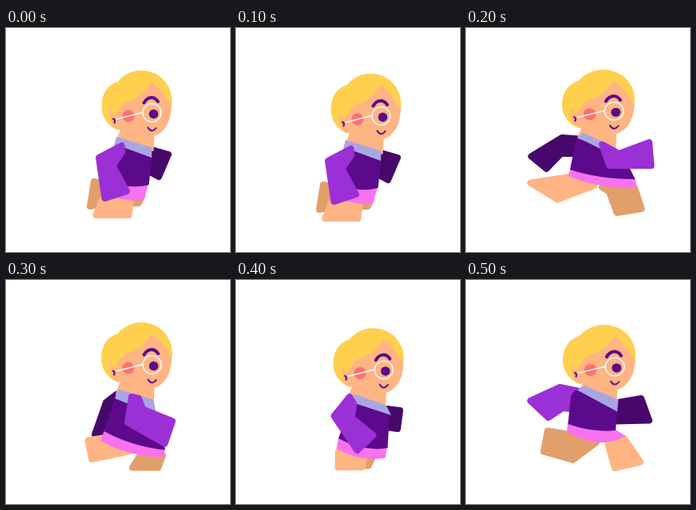
An HTML page without scripts for the animation above (0.6 s loop, 280 by 280 pixels).

```html
<!DOCTYPE html>
<html lang="en">
<head>
<meta charset="utf-8">
<title>Running character</title>
<style>
  html, body { margin: 0; width: 100%; height: 100%; overflow: hidden; background: #fff; }
  svg { display: block; width: 100vw; height: 100vh; }

  .pose { visibility: hidden; animation: show .6s step-end infinite; animation-delay: calc(var(--i) * .1s - .6s); }
  @keyframes show {
    0% { visibility: visible; }
    16.6667%, 100% { visibility: hidden; }
  }

  /* limbs get rounded corners from a stroke in the fill colour */
  .limb { fill: var(--c); stroke: var(--c); stroke-width: 8; stroke-linejoin: round; }
  .arm { --c: #9b30d6; }
  .far-arm { --c: #47086b; }
  .leg { --c: #ffb483; }
  .far-leg { --c: #e19f6c; }
  .torso { fill: #5b0a8b; }
  .hem { fill: #f872ef; }
  .collar { fill: #a9a6e5; }
  .skin { fill: #ffb483; }
  .hair { fill: #ffd04e; }
  .ink { fill: none; stroke: #5b0a8b; stroke-linecap: round; }
  .glass { fill: none; stroke: #fff; stroke-width: 1.5; }
</style>
</head>
<body>
<svg viewBox="0 0 280 280">
  <defs>
    <g id="head">
      <path class="hair" d="M140 67C146 59 157 53 169 53C191 53 207.500 70 207.500 92L206 103L140 128C128 123 119.500 112 119.500 98C119.500 82 127 71 140 67Z"/>
      <path class="skin" d="M182 67C190 73 199 84 207 98C206 117 199 130 185.500 135L184.500 154L137 143L143 127C135 127 130 119 131 112L129.500 98Q132 105 135 110C141 107 142 97 150 92C163 89 174 80 182 67Z"/>
      <circle cx="153" cy="110" r="7.600" fill="#ff716c"/>
      <path class="ink" stroke-width="2" d="M134 113.500Q137 115 135.500 118.500"/>
      <path class="ink" stroke-width="4" d="M172.500 93.500C177 85.500 185 84.500 190 92"/>
      <path class="ink" stroke-width="2" d="M177.500 124.500Q182 132 187.500 125"/>
      <circle cx="184.500" cy="107.500" r="5.800" fill="#5b0a8b"/>
      <circle class="glass" cx="182.400" cy="106" r="11.400"/>
      <path class="glass" d="M171 105.500L138 114"/>
    </g>

    <g id="passing">
      <path class="limb far-arm" d="M182 152L203 158L191 186L178 179Z"/>
      <path class="limb far-leg" d="M110 192L122 194L120 220L105 223ZM158 210L170 210L166 219L157 219Z"/>
      <path class="limb leg" d="M120 215L156 213L153.500 234L112.500 234Z"/>
      <path class="hem" d="M139 196L178 195L172.500 214.500Q158 218 138 212Z"/>
      <use href="#head"/>
      <path class="torso" d="M137 142L183 159L178.500 196Q160 201 138 195Z"/>
      <path class="collar" d="M138 136L182.500 149.500L182 162L149 150L135 147Z"/>
      <path class="limb arm" d="M116 162L144.500 147L145 155L133.500 172L151 204L123.500 213Z"/>
    </g>
  </defs>

  <use class="pose" style="--i:0" href="#passing"/>
  <use class="pose" style="--i:1" href="#passing" x="-1" y="4"/>

  <g class="pose" style="--i:2">
    <path class="limb far-arm" d="M120 137L146 139L136 157L119 157L100.500 176L81.500 160.500Z"/>
    <path class="limb far-leg" d="M170 199L211 200L219.500 226L188.500 231L179 205Z"/>
    <path class="limb leg" d="M80.500 193.500L130 186L160 197L114.500 214.500Z"/>
    <path class="hem" d="M131 175L211 187L213.500 198.500Q168 202 127.500 185Z"/>
    <use href="#head" transform="matrix(1.035 0 0 .98 -3.700 0)"/>
    <path class="torso" d="M138 137L168 149L203 172L211.500 189Q166 189 130 177Z"/>
    <path class="collar" d="M145 130.500L180 146L172 153L140 137Z"/>
    <path class="limb arm" d="M170 145.500L191 157L229 143L231.500 172L179 172Z"/>
  </g>

  <g class="pose" style="--i:3">
    <path class="limb far-arm" d="M125 153L138 143L142 158L120 193L111 193Z"/>
    <path class="limb far-leg" d="M167 220L196 219L190.500 234.500L158 234.500Z"/>
    <path class="limb leg" d="M102.500 200.500L124 197L155 214L107 224Z"/>
    <path class="hem" d="M123.500 186L199 209L196.500 221.500Q154 221 118.500 201Z"/>
    <use href="#head" transform="matrix(1.010 0 0 1 -1.700 0)"/>
    <path class="torso" d="M136 147L188 166L199 212.500Q157 208 122.500 189Z"/>
    <path class="collar" d="M140 136.500L184.500 149.500L188 169L136 148Z"/>
    <path class="limb arm" d="M157 146L166 148L171 161.500L208 176.500L198.500 204.500L152 178Z"/>
  </g>

  <g class="pose" style="--i:4">
    <path class="limb far-arm" d="M188 161L205 163L202 186L188 184Z"/>
    <path class="limb far-leg" d="M158 222L170 223L166 232L158 232Z"/>
    <path class="limb leg" d="M128 215L161 220L157.500 234L127.500 234Z"/>
    <path class="hem" d="M128.500 197L189 208L186.500 222.500Q157 228 125.500 211Z"/>
    <use href="#head" transform="matrix(1.005 0 0 .985 1.400 8)"/>
    <path class="torso" d="M146 150L192 167L189.500 210Q160 215 128 198Z"/>
    <path class="collar" d="M146 142L187.500 156.500L194 169L150 154.500Z"/>
    <path class="limb arm" d="M142 146L147.500 155L144.500 172L171.500 194L151.500 213L122.500 170Z"/>
  </g>

  <g class="pose" style="--i:5">
    <path class="limb far-arm" d="M190 153L219 148L229 175.500L188 176.500Z"/>
    <path class="limb far-leg" d="M102 188.500L130 193L163 203L133.500 225L97 214.500Z"/>
    <path class="limb leg" d="M177.500 206L198 198L218 227.500L186 235Z"/>
    <path class="limb arm" d="M117.500 134L142 139L130 161L121 160L103 172L80.500 151Z"/>
    <path class="hem" d="M127.500 178L187 187L199.500 195Q166 214 126 189Z"/>
    <use href="#head" transform="matrix(1.035 0 0 .99 -2.700 3.500)"/>
    <path class="torso" d="M140 137L189.500 161L187 188Q158 191 127.500 180L131 146Q133 139 140 137Z"/>
    <path class="collar" d="M148 132L190.500 149.500L189 164.500L139 137.500Z"/>
  </g>
</svg>
</body>
</html>
```
